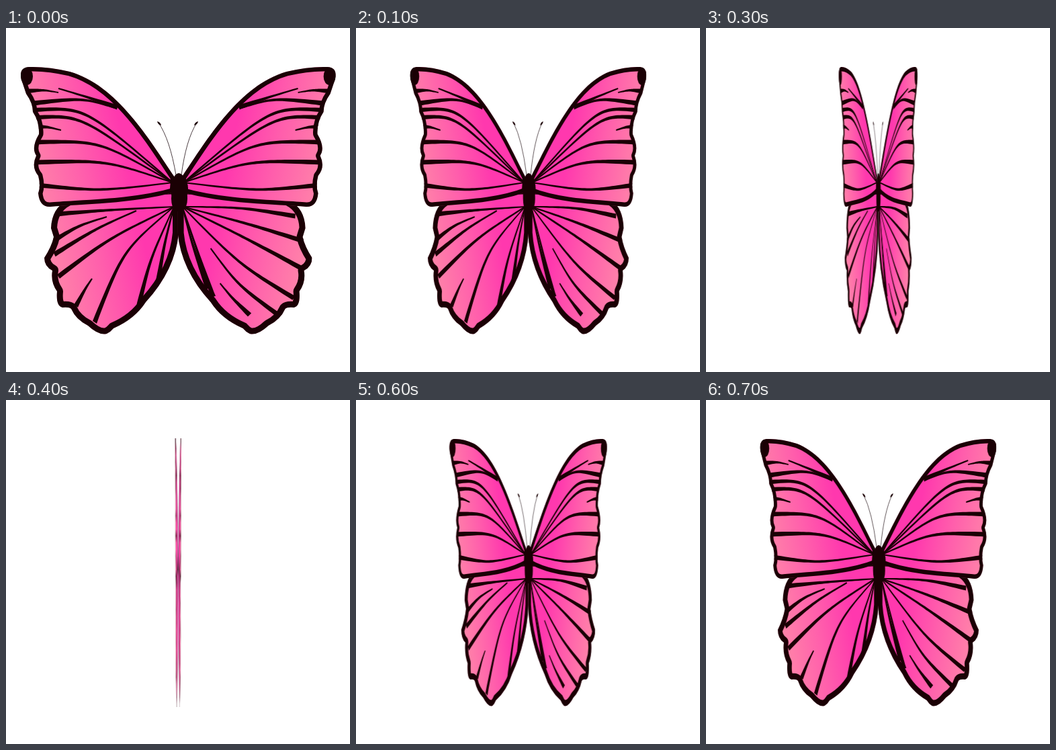
An HTML page that plays this animation: 512x512 px, repeating every 0.8 s.

```html
<!DOCTYPE html>
<html lang="en">
<head>
<meta charset="utf-8">
<title>Butterfly</title>
<style>
  html, body { margin: 0; width: 100%; height: 100%; overflow: hidden; background: #fff; }
  svg { display: block; width: 100%; height: 100%; }
  #fly { transform-origin: 256.3px 256px; animation: flap 800ms step-end infinite; }
  @keyframes flap {
    0%, 100% { transform: scaleX(1); }
    12.5%, 87.5% { transform: scaleX(.75); }
    25%, 75% { transform: scaleX(.5); }
    37.5%, 62.5% { transform: scaleX(.25); }
    50% { transform: scaleX(.02); }
  }
  .ink { fill: #1a0004; }
  .skin { fill: url(#pink); }
  .rim { fill: none; stroke: #1a0004; stroke-linejoin: round; }
  .feeler { fill: none; stroke: #3a2c30; stroke-width: .9; }
</style>
</head>
<body>
<svg viewBox="0 0 512 512">
  <defs>
    <linearGradient id="pink" gradientUnits="userSpaceOnUse" x1="45" y1="270" x2="215" y2="235">
      <stop offset="0" stop-color="#ff86a9"/>
      <stop offset=".45" stop-color="#ff5fac"/>
      <stop offset=".85" stop-color="#ff38ae"/>
    </linearGradient>
    <path id="fore" d="M251 222C213 165 165 85 95 65Q62 57 34 58Q17 59 24 80L30 98Q40 112 40 125Q50 140 49 158Q37 178 45 190Q37 207 48 220Q52 235 48 246Q50 267 66 266C110 262 190 262 251 244Z"/>
    <path id="hind" d="M257 238C200 240 125 246 92 256Q68 268 67 298L71 311Q68 325 57 342Q57 355 69 361Q66 378 76 392Q74 414 84 416Q94 415 97 418Q104 434 122 443Q138 458 150 455Q156 452 160 447Q192 433 208 408Q252 360 257 305Z"/>
    <clipPath id="foreClip"><use href="#fore"/></clipPath>
    <clipPath id="hindClip"><use href="#hind"/></clipPath>
  </defs>
  <g id="fly">
    <g id="left"></g>
    <g id="right" transform="translate(512.6 0) scale(-1 1)"></g>
    <path class="ink" d="M257 216Q263 217 264 222Q271 228 271 239Q269 246 270 254Q270 268 262 273H253Q246 268 246 254Q247 246 244 239Q245 228 250 222Q252 217 257 216Z"/>
    <path class="feeler" d="M253 219Q244 166 227 141M261 219Q268 166 284 141"/>
    <path class="ink" d="M225 139Q230 140 231 145Q226 144 225 139ZM286 139Q281 140 280 145Q285 144 286 139Z"/>
  </g>
</svg>
<script>
// Vein: wide tip, bend, then thin end (the wing root if omitted).
const foreVeins = [
  '166 118 125 104 78 90',
  '32 94 55 92 78 96',
  '40 112 115 104 162 119',
  '44 122 118 118',
  '46 133 112 130',
  '46 147 62 147 82 152',
  '47 170 140 168',
  '43 200 150 197',
  '48 234 140 243'
];
const leftVeins = [
  '74 277 150 271',
  '72 316 108 294 150 281',
  '72 337 135 298 194 272',
  '78 370 155 312',
  '104 414 118 388 128 373',
  '132 438 175 330',
  '198 412 215 343',
  '226 380 236 320'
];
const rightVeins = [
  '82 280 160 267',
  '70 317 160 289',
  '70 359 155 313',
  '84 402 165 352',
  '106 428 168 382 208 328',
  '150 427 176 402 194 380',
  '204 400 225 340',
  '212 388 236 320'
];

// Tapered blade around a curve pulled towards the bend.
function vein(text, root) {
  const [x, y, bx, by, ex = root[0], ey = root[1]] = text.split(' ').map(Number);
  const len = Math.hypot(ex - x, ey - y);
  const nx = (y - ey) / len, ny = (ex - x) / len;
  const at = (px, py, w) => `${(px + nx * w).toFixed(1)} ${(py + ny * w).toFixed(1)}`;
  const [wide, mid, thin] = [3.6, 1.7, 1];
  const k1 = at(bx, by, mid), k2 = at(bx, by, -mid);
  return `<path class="ink" d="M${at(x, y, wide)}C${k1} ${k1} ${at(ex, ey, thin)}` +
    `L${at(ex, ey, -thin)}C${k2} ${k2} ${at(x, y, -wide)}Z"/>`;
}

function wing(id, veins, root, rim) {
  return `<g clip-path="url(#${id}Clip)"><use href="#${id}" class="skin"/>` +
    veins.map(v => vein(v, root)).join('') +
    `<use href="#${id}" class="rim" stroke-width="${rim}"/></g>`;
}

function side(id, hindVeins) {
  document.getElementById(id).innerHTML =
    wing('hind', hindVeins, [250, 266], 18) +
    wing('fore', foreVeins, [248, 230], 13) +
    '<ellipse class="ink" cx="31" cy="72" rx="9" ry="13"/>';
}

side('left', leftVeins);
side('right', rightVeins);
</script>
</body>
</html>
```
